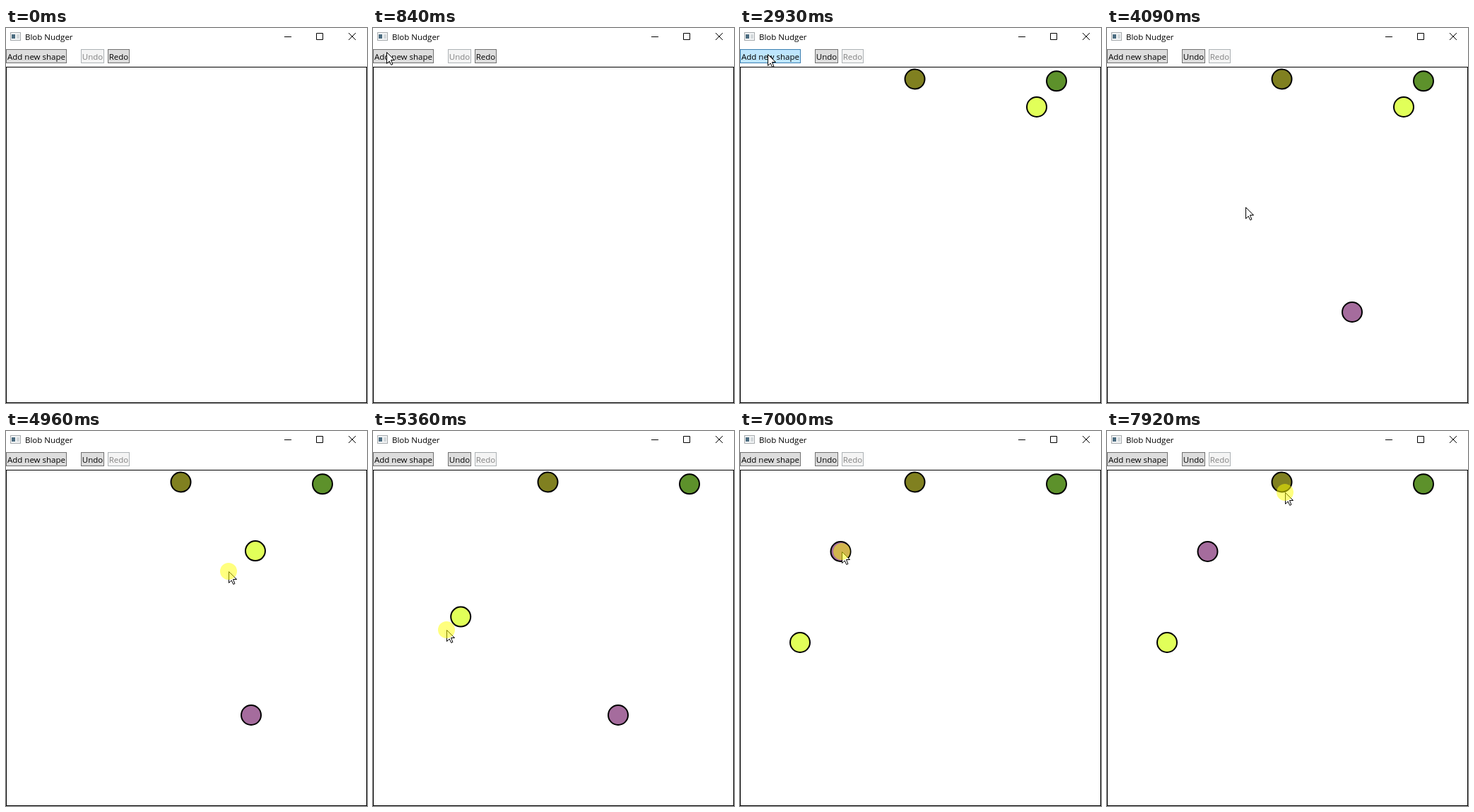
These frames come from a looping animation (511 by 532 pixels, 8000 ms). An HTML page:

```html
<!DOCTYPE html>
<html lang="en">
<head>
<meta charset="utf-8">
<title>Blob Nudger</title>
<style>
  html, body { margin: 0; width: 100%; height: 100%; overflow: hidden; background: #fff; }
  svg { display: block; width: 511px; height: 532px; }
  text { font: 11.5px "Open Sans", "Noto Sans", sans-serif; }
  .button rect { fill: #ddd; stroke: #707070; }
  .button text { text-anchor: middle; }
  .button.disabled rect { fill: #f4f4f4; stroke: #adb2b5; }
  .button.disabled text { fill: #838383; }
  .button.hover rect { fill: #bee6fd; stroke: #3c7fb1; }
  .button.pressed rect { fill: #c4e5f6; stroke: #2c628b; }
  #shapes circle { stroke: #000; stroke-width: 2; }
</style>
</head>
<body>
<svg viewBox="0 0 511 532">
  <rect width="511" height="532" fill="#fff"/>
  <g id="icon">
    <rect x="6.5" y="6.5" width="14" height="11" fill="#f4f6f7" stroke="#a5a9ac"/>
    <rect x="8" y="9" width="5" height="6" fill="#4b6c80"/>
    <rect x="15" y="9" width="4" height="6" fill="#d3d8db"/>
  </g>
  <text x="27" y="17">Blob Nudger</text>
  <path d="M394 12.5H404M439.5 7.5H448.5V16.5H439.5ZM485 7L495 17M495 7L485 17" fill="none" stroke="#000"/>
  <g class="button" id="add"><rect x=".5" y="30.5" width="85" height="19"/><text x="43" y="45">Add new shape</text></g>
  <g class="button" id="undo"><rect x="106.5" y="30.5" width="32" height="19"/><text x="122.5" y="45">Undo</text></g>
  <g class="button" id="redo"><rect x="144.5" y="30.5" width="30" height="19"/><text x="159.5" y="45">Redo</text></g>
  <rect x=".5" y="55.5" width="510" height="476" fill="none" stroke="#000"/>
  <g id="shapes"></g>
  <g id="pointer">
    <path d="M.5 .5V16.5L4.2 13L6.8 18.5L8.9 17.5L6.5 11.5H11.5Z" fill="#fff" stroke="#000" stroke-linejoin="round"/>
    <circle id="glow" r="12" fill="#ff0" fill-opacity=".5"/>
  </g>
</svg>
<script>
const LOOP = 8000;
const STEP = 75;   // the pointer is redrawn this often
const LAG = 54;    // a dragged shape trails the pointer
const PRESS = 85;  // length of a button click
const $ = id => document.getElementById(id);

// Pointer motion along Bezier curves; a stroke with a grab offset drags a shape.
const stroke = (start, end, path, extra) => ({ start, end, path, ...extra });
const dragYellow = stroke(4810, 5410, [[420, 118], [283, 266], [121, 230], [85, 306]], { release: 5660, grab: [0, 6] });
const dragPurple = stroke(6450, 6920, [[348.5, 403], [252, 313], [144, 171]], { release: 7070, grab: [1.5, 0] });
const strokes = [
  stroke(140, 890, [[364, 516], [150, 190], [-61, 29], [41, 29]]),
  stroke(1070, 1130, [[40, 33], [39, 37]]),
  stroke(3860, 4610, [[60, 52], [140, 340], [540, 440], [420, 118]]),
  dragYellow,
  stroke(5830, 6205, [[92, 309], [230, 375], [352, 411]]),
  dragPurple,
  stroke(7070, 7445, [[144, 171], [170, 145], [252, 106]]),
  stroke(7540, 7765, [[252, 92], [252, 62], [252, 87]])
];

const shapes = [
  { home: [420, 112], fill: "#e1ff59", drag: dragYellow },
  { home: [247.5, 72.5], fill: "#808020" },
  { home: [448, 75.3], fill: "#5d912b" },
  { home: [347, 403], fill: "#a56c9d", drag: dragPurple }
];

shapes.forEach((shape, i) => {
  shape.click = 1530 + i * 623;
  shape.el = document.createElementNS("http://www.w3.org/2000/svg", "circle");
  shape.el.setAttribute("r", 14);
  shape.el.setAttribute("fill", shape.fill);
  $("shapes").append(shape.el);
});

const within = (t, from, to) => t >= from && t < to;
const show = (el, on) => el.setAttribute("visibility", on ? "inherit" : "hidden");
const moveTo = (el, [x, y]) => el.setAttribute("transform", `translate(${x} ${y})`);
const mix = (a, b, u) => a.map((v, i) => v + (b[i] - v) * u);

function bezier(points, u) {
  while (points.length > 1) points = points.slice(1).map((p, i) => mix(points[i], p, u));
  return points[0];
}

function along({ start, end, path }, t, lag = 0) {
  const now = start + Math.floor((t - start) / STEP) * STEP;
  const late = now < end ? lag : 0;
  return bezier(path, Math.max(0, Math.min(1, (now - late - start) / (end - start))));
}

function place({ home, drag }, t) {
  if (!drag || t < drag.start) return home;
  return along(drag, t, LAG).map((v, i) => v - drag.grab[i]);
}

function draw(t) {
  for (const shape of shapes) {
    show(shape.el, t >= shape.click + PRESS);
    moveTo(shape.el, place(shape, t));
  }

  const current = strokes.findLast(s => t >= s.start);
  show($("pointer"), current);
  if (current) moveTo($("pointer"), along(current, t).map(Math.round));

  const pressed = shapes.some(s => within(t, s.click, s.click + PRESS));
  const dragging = strokes.some(s => s.grab && within(t, s.start, s.release));
  show($("glow"), pressed || dragging || t >= 7920);

  const used = t >= shapes[0].click;
  $("undo").classList.toggle("disabled", !used);
  $("redo").classList.toggle("disabled", used);
  $("add").classList.toggle("hover", within(t, shapes[0].click, 3860));
  $("add").classList.toggle("pressed", pressed);
}

const begin = performance.now();
function tick() {
  draw((performance.now() - begin) % LOOP);
  requestAnimationFrame(tick);
}
tick();
</script>
</body>
</html>
```
